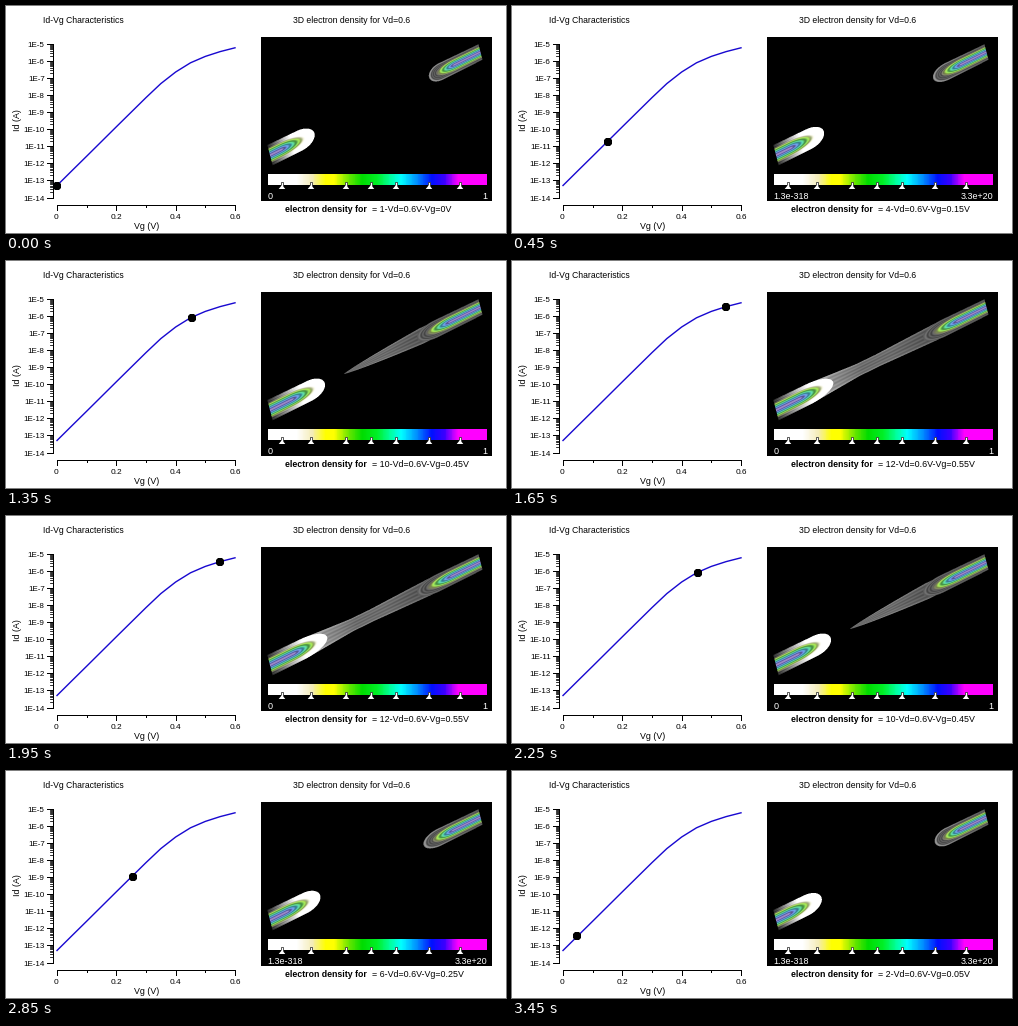
Recreate the animation shown at these times as a matplotlib script. Size 500 by 227 pixels, loop 3600 ms.

```python
import numpy as np
import matplotlib.pyplot as plt
from matplotlib.animation import FuncAnimation
from matplotlib.colors import LinearSegmentedColormap
from matplotlib.patches import Polygon, Rectangle

W, H, DPI = 500, 227, 100
STEPS = 13
plt.rcParams["font.family"] = "Liberation Sans"

fig = plt.figure(figsize=(W / DPI, H / DPI), dpi=DPI, facecolor="white")
ax = fig.add_axes([0, 0, 1, 1])
ax.axis("off")
ax.set_autoscale_on(False)


def pt(px):
    return px * 72 / DPI


def text(x, y, s, px=8.64, **kw):
    return ax.text(x, y, s, fontsize=pt(px), va="baseline", **kw)


def line(xs, ys, color="black", px=1, **kw):
    return ax.plot(xs, ys, color=color, lw=pt(px), **kw)[0]


# --- Id-Vg plot ---
CURVE_Y = np.array([179.5, 164.8, 150.2, 135.5, 120.8, 106.2, 91.6, 77.6,
                    66, 56.8, 50.4, 45.6, 41.8])
MARK_X = [51, 64.5, 80, 96, 111, 127, 141, 157, 171, 186, 200, 214, 228.5]
DECADE = 17.06


def draw_plot():
    text(37, 17, "Id-Vg Characteristics")
    line([46.5, 46.5], [38, 192])
    for i in range(10):
        y = 38 + i * DECADE
        line([40.5, 46.5], [y, y])
        text(38.7, y + 3, f"1E-{5 + i}", 8, ha="right")
        if i:
            for m in range(2, 10):
                ym = y - DECADE * np.log10(m)
                line([43.5, 46.5], [ym, ym], px=0.8)
    line([51, 229], [198.5, 198.5])
    for i in range(7):
        x = 51 + i * 178 / 6
        line([x, x], [198.5, 201 if i % 2 else 204])
    for i, s in enumerate(["0", "0.2", "0.4", "0.6"]):
        text(50.5 + i * 59.5, 213, s, 8.3, ha="center")
    text(140.5, 223.3, "Vg (V)", 8.84, ha="center")
    ax.text(11.3, 114.5, "Id (A)", fontsize=pt(8.84), rotation=90,
            ha="center", va="center")
    line(np.linspace(51, 229, STEPS), CURVE_Y, "#1808d0", 1.4)


# --- electron density rods ---
X0, X1, Y0, Y1, SS = 255, 486, 31, 167, 3
SHELLS = LinearSegmentedColormap.from_list("shells", [
    (0, (.56, .46, .66)), (.16, (.40, .44, .76)), (.30, (.28, .66, .74)),
    (.44, (.34, .74, .36)), (.56, (.56, .74, .28)), (.68, (.74, .74, .50)),
    (1, (.6, .6, .6))])


def rod_coords():
    xs = X0 + (np.arange((X1 - X0) * SS) + .5) / SS
    ys = Y0 + (np.arange((Y1 - Y0) * SS) + .5) / SS
    x, y = np.meshgrid(xs, ys)
    skew = 0
    for _ in range(5):
        px = x - skew
        s = (px - 264) / 210.5
        half = 10.2 - 2.4 * s
        w = (y - 149.2 + 103.2 * s) / half
        skew = .26 * np.clip(w, -1.2, 1.2) * half
    return px, w, (s >= 0) & (s <= 1)


PX, ROD_W, ON_ROD = rod_coords()


def cap(depth, length):
    """Normalised radius of a rod whose rounded tip lies at depth 0."""
    nose = np.clip((length - depth) / length, 0, None)
    return np.hypot(ROD_W, nose)


def blend(img, rgb, mask):
    a = mask[..., None]
    img *= 1 - a
    img += a * rgb


def grey(v):
    return np.repeat(np.asarray(v)[..., None], 3, axis=-1)


def end_rod(img, depth, length, inner, glow, rim):
    """Nested coloured shells inside a grey or white glowing skin."""
    skin = cap(depth, length)
    q = cap(depth, inner)
    streak = 1 + .24 * np.sin(38 * q + 2 * ROD_W)
    rgb = SHELLS(np.clip(q, 0, 1))[..., :3] * streak[..., None]
    edge = np.clip((q - .58) / .14, 0, 1)[..., None]
    striped = glow * (1 + .3 * (1 - glow) * np.sin(38 * skin))
    rgb = rgb * (1 - edge) + grey(striped) * edge
    outline = (np.exp(-((skin - .92) / .07) ** 2) * rim)[..., None]
    rgb = rgb * (1 - outline) + .72 * outline
    blend(img, np.clip(rgb, 0, 1), ON_ROD & (skin < 1))


def channel_width(k):
    if k == 8:
        return .8 * np.clip((PX - 388) / 30, 0, 1) ** .7
    if k == 9:
        return .9 * np.clip((PX - 338) / 77, 0, 1) ** .75
    neck = {10: .36, 11: .66, 12: .80}[k]
    left = np.clip((345 - PX) / 40, 0, 1)
    right = np.clip((PX - 365) / 60, 0, 1)
    return neck + (.95 - neck) * np.maximum(left, right)


def density(k):
    img = np.zeros(PX.shape + (3,))
    if k >= 8:
        r = np.abs(ROD_W) / np.maximum(channel_width(k), 1e-6)
        tone = .42 + .08 * np.clip(r, 0, 1) ** 3 + .05 * np.cos(14 * r)
        tone = tone - .10 * np.clip((PX - 380) / 40, 0, 1)
        tone = tone + .16 * np.clip((350 - PX) / 35, 0, 1) * (k > 9)
        blend(img, grey(tone), ON_ROD & (r < 1) & (PX > 300) & (PX < 450))

    # source side: dark cut end, white rounded tip
    tip = 308.5 + 1.15 * k
    glow = np.clip(.24 + .85 * (PX - 266) / (tip - 286), 0, 1)
    end_rod(img, tip - PX, 15 if k < 10 else 24, 34, glow, 0)

    # drain side: dim skin with a light outline around the tip
    tip = 423 - .22 * min(k, 7.4) ** 2
    depth = PX - tip
    glow = np.full(PX.shape, .33)
    rim = .75 * np.clip(1 - depth / 55, .15, 1) * (1 if k < 8 else .35)
    length = 12 + .9 * k
    end_rod(img, depth, length, length + 14, glow, rim)
    h, w = Y1 - Y0, X1 - X0
    return np.clip(img.reshape(h, SS, w, SS, 3).mean(axis=(1, 3)), 0, 1)


RODS = [density(k) for k in range(STEPS)]

LEGEND = LinearSegmentedColormap.from_list("legend", [
    (0, "#ffffff"), (.13, "#ffffff"), (.20, "#f4ecb8"), (.26, "#ffff00"),
    (.30, "#ffff00"), (.37, "#66e600"), (.43, "#00dc00"), (.50, "#00f028"),
    (.56, "#00ffa0"), (.61, "#00ffff"), (.68, "#0090ff"), (.75, "#0010ff"),
    (.81, "#3c00ff"), (.87, "#ff00ff"), (1, "#ff00ff")])


def draw_panel():
    text(287, 17, "3D electron density for Vd=0.6")
    ax.add_patch(Rectangle((255, 31), 231, 164, fc="black", ec="none"))
    ax.imshow(np.linspace(0, 1, 219)[None], cmap=LEGEND, aspect="auto",
              extent=(262, 481, 179, 168), interpolation="nearest", zorder=2)
    for x in (276, 305, 340, 365, 390, 423, 454):
        ax.add_patch(Rectangle((x - 1.1, 175.5), 2.2, 4, fc="white",
                               ec="#333333", lw=pt(.8), zorder=3))
        ax.add_patch(Polygon([(x, 179), (x - 3.3, 183), (x + 3.3, 183)],
                             fc="white", ec="none", zorder=4))
    text(279, 206, "electron density for", 8.8, weight="bold")


draw_plot()
draw_panel()
rods = ax.imshow(RODS[0], extent=(X0, X1, Y1, Y0), aspect="auto",
                 interpolation="nearest", zorder=2)
ax.set_xlim(0, W)
ax.set_ylim(H, 0)
dot = line([51], [CURVE_Y[0]], marker="8", ms=pt(8.6), mew=0, zorder=5)
low = text(261.5, 192.7, "0", 9, color="white", zorder=5)
high = text(481, 192.7, "1", 9, color="white", ha="right", zorder=5)
caption = text(365.5, 206, "", 8.84)


def update(i):
    k = 12 - abs(12 - i)
    rods.set_data(RODS[k])
    dot.set_data([MARK_X[k]], [CURVE_Y[k]])
    tiny = 1 <= k <= 6
    low.set_text("1.3e-318" if tiny else "0")
    high.set_text("3.3e+20" if tiny else "1")
    caption.set_text(f"= {k + 1}-Vd=0.6V-Vg={round(k * .05, 2):g}V")
    return rods, dot, low, high, caption


anim = FuncAnimation(fig, update, frames=24, interval=150, repeat=True,
                     init_func=lambda: update(0), blit=False)
plt.show()
```
